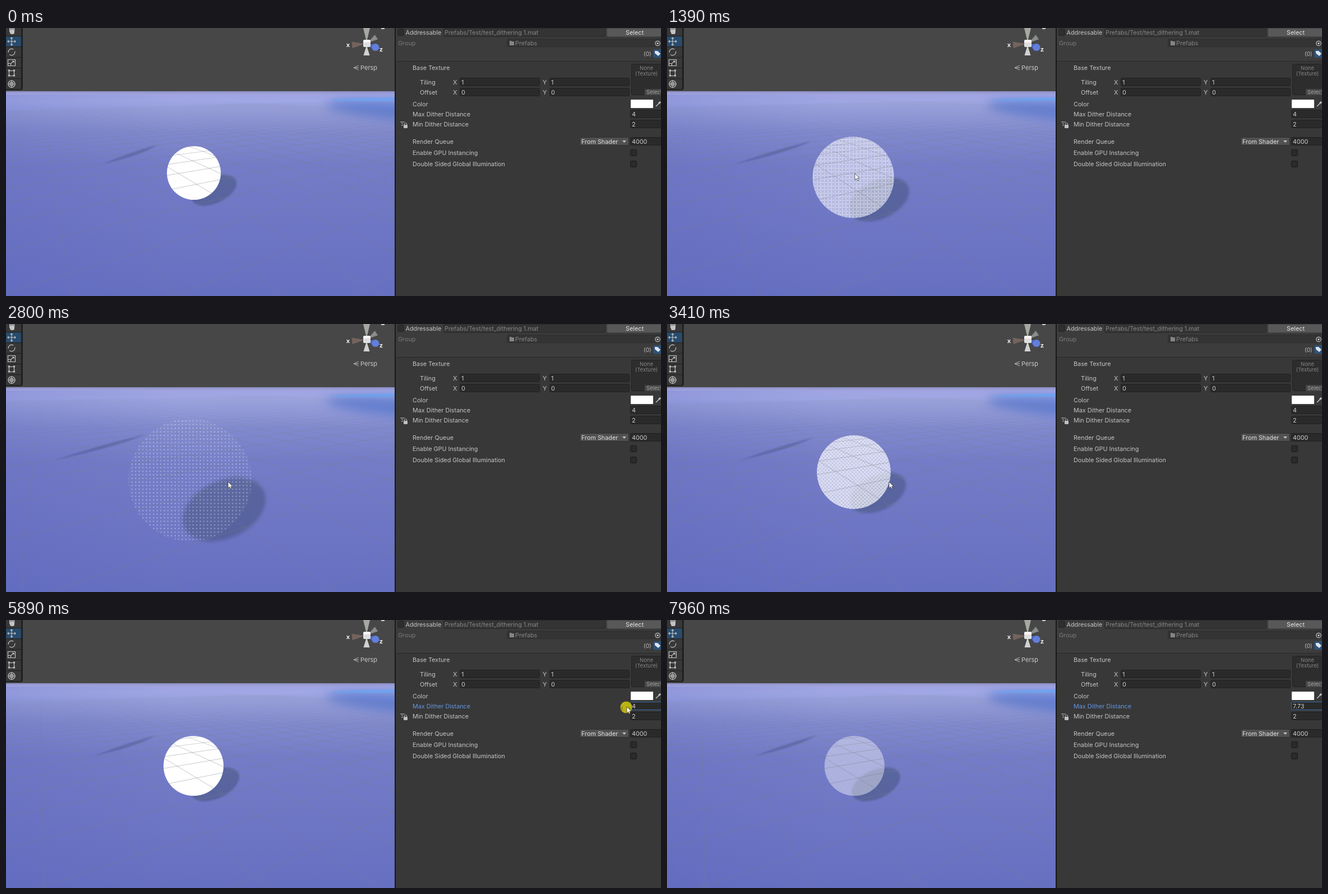
Write an HTML page with a canvas that moves like this. It is 1168 by 479 pixels and loops after 8 s.

```html
<!DOCTYPE html>
<html>
<head>
<meta charset="utf-8">
<style>
html, body { margin: 0; width: 100%; height: 100%; overflow: hidden; background: #383838; }
canvas { display: block; }
</style>
</head>
<body>
<canvas id="stage" width="1168" height="479"></canvas>
<script>
const W = 1168, H = 479, VIEW_W = 693, HORIZON = 113, LOOP = 8000;
const FONT = 'Inter, "Noto Sans", sans-serif';
const ctx = document.getElementById('stage').getContext('2d');

// ---------- timing ----------
const clamp01 = v => Math.max(0, Math.min(1, v));
const easeOut = f => 1 - (1 - f) ** 2;
const stepDown = (v, step) => Math.floor(v / step) * step;

// Scrolling in is one steady exponential dolly; scrolling out comes in bursts.
function distanceAt(t) {
  if (t < 730) return 4.85;
  if (t < 2670) return Math.max(1.73, 4.85 * Math.exp(-0.00068 * stepDown(t - 730, 76)));
  const burst = 200, period = 340, notch = burst / 3;
  const elapsed = t - 2670;
  const scrolled = Math.floor(elapsed / period) * burst +
    Math.min(burst, stepDown(elapsed % period, notch) + notch);
  return 1.73 * (4.35 / 1.73) ** clamp01(scrolled / (3 * burst));
}

function maxDistanceAt(t) {
  if (t >= 7900) return 7.73;
  return 4 + 3.6 * easeOut(clamp01(stepDown(t - 5890, 67) / 1400));
}

function cursorAt(t) {
  let x = 1086, y = 136;
  const glide = (start, end, toX, toY) => {
    const f = easeOut(clamp01(stepDown(t - start, 67) / (end - start)));
    x += (toX - x) * f;
    y += (toY - y) * f;
  };
  glide(70, 460, 335, 260);
  glide(1590, 2130, 396, 282);
  glide(4010, 4750, 1158, 166);
  glide(4820, 5230, 1107, 155);
  return { x, y };
}

// ---------- drawing helpers ----------
function box(x, y, w, h, fill, border, radius = 2) {
  ctx.beginPath();
  ctx.roundRect(x, y, w, h, radius);
  ctx.fillStyle = fill;
  ctx.fill();
  if (border) {
    ctx.strokeStyle = border;
    ctx.lineWidth = 1;
    ctx.stroke();
  }
}
function text(str, x, y, color = '#c4c4c4', size = 10.8, align = 'left', weight = 400) {
  ctx.font = `${weight} ${size}px ${FONT}`;
  ctx.textAlign = align;
  ctx.textBaseline = 'middle';
  ctx.fillStyle = color;
  ctx.fillText(str, x, y + 0.7);
}
function shape(path, fill, stroke, width = 1) {
  const p = new Path2D(path);
  if (fill) { ctx.fillStyle = fill; ctx.fill(p); }
  if (stroke) { ctx.strokeStyle = stroke; ctx.lineWidth = width; ctx.stroke(p); }
}
function ellipse(x, y, rx, ry, fill, angle = 0, blur = 0) {
  ctx.save();
  if (blur) ctx.filter = `blur(${blur}px)`;
  ctx.beginPath();
  ctx.ellipse(x, y, rx, ry, angle, 0, 2 * Math.PI);
  ctx.fillStyle = fill;
  ctx.fill();
  ctx.restore();
}
const disc = (x, y, r, fill) => ellipse(x, y, r, r, fill);
function ring(x, y, r, color, width = 1.2) {
  ctx.beginPath();
  ctx.arc(x, y, r, 0, 2 * Math.PI);
  ctx.strokeStyle = color;
  ctx.lineWidth = width;
  ctx.stroke();
}
function turned(x, y, angle, draw) {
  ctx.save();
  ctx.translate(x, y);
  ctx.rotate(angle);
  draw();
  ctx.restore();
}

// ---------- scene ----------
const groundFill = ctx.createLinearGradient(0, HORIZON, 0, H);
groundFill.addColorStop(0, '#8d90c4');
groundFill.addColorStop(0.015, '#a0a4e0');
groundFill.addColorStop(0.05, '#a0a8e6');
groundFill.addColorStop(0.2, '#8189ce');
groundFill.addColorStop(0.36, '#747cc7');
groundFill.addColorStop(1, '#6670c1');

const leftShade = ctx.createLinearGradient(0, 0, 300, 0);
leftShade.addColorStop(0, 'rgba(85,95,185,.2)');
leftShade.addColorStop(1, 'rgba(85,95,185,0)');

const gridFade = ctx.createLinearGradient(0, 120, 0, 240);
gridFade.addColorStop(0, 'rgba(120,123,132,0)');
gridFade.addColorStop(0.4, 'rgba(120,123,132,.15)');
gridFade.addColorStop(1, 'rgba(120,123,132,.42)');

function drawGround() {
  ctx.fillStyle = '#474747';
  ctx.fillRect(0, 0, VIEW_W, HORIZON);
  ctx.fillStyle = groundFill;
  ctx.fillRect(0, HORIZON, VIEW_W, H);
  ctx.fillStyle = leftShade;
  ctx.fillRect(0, 119, 300, H);
  ellipse(720, 150, 150, 17, 'rgba(82,116,210,.75)', 0.08, 9);
  ellipse(690, 127, 110, 2.5, 'rgba(104,166,243,.9)', -0.02, 1.5);
}

// Ground points are (side, ahead) relative to the sphere; the camera dollies towards it.
const FOCAL = 466, PITCH = 0.274, VIEW_X = 340, GRID_YAW = Math.PI / 6;
const SIN = Math.sin(PITCH), COS = Math.cos(PITCH);

function drawGrid(d) {
  const height = 0.87 + SIN * d, near = 0.4, reach = 60;
  const depthOf = ahead => d + COS * ahead + 0.235;
  const gridPoint = (a, b) => ({
    side: a * Math.sin(GRID_YAW) + b * Math.cos(GRID_YAW),
    ahead: 1.314 - a * Math.cos(GRID_YAW) + b * Math.sin(GRID_YAW)
  });
  const plot = (command, { side, ahead }) => {
    const depth = depthOf(ahead);
    ctx[command](VIEW_X + FOCAL * side / depth, HORIZON + FOCAL * height / (COS * depth));
  };
  const line = pointAt => {
    const base = depthOf(pointAt(0).ahead), slope = depthOf(pointAt(1).ahead) - base;
    const cut = (near - base) / slope;
    const from = slope > 0 ? Math.max(-reach, cut) : -reach;
    const to = slope > 0 ? reach : Math.min(reach, cut);
    if (from >= to) return;
    plot('moveTo', pointAt(from));
    plot('lineTo', pointAt(to));
  };
  ctx.beginPath();
  for (let i = -32; i <= 32; i++) {
    line(s => gridPoint(s, i));
    line(s => gridPoint(i, s));
  }
  ctx.strokeStyle = gridFade;
  ctx.lineWidth = 1;
  ctx.stroke();
}

function drawShadows(d, r) {
  const grow = r - 48, closer = 4.85 - d;
  ellipse(371 + 0.29 * grow, 290 + 0.67 * grow, 43 + 0.57 * grow, 23 + 0.46 * grow,
    'rgba(64,80,120,.5)', -0.436, r / 32);

  const x1 = 172 - 31 * closer, x2 = 270 - 8 * closer, y1 = 243, y2 = 209 - 4 * closer;
  const mx = (x1 + x2) / 2, my = (y1 + y2) / 2;
  ctx.save();
  ctx.filter = 'blur(1.2px)';
  shape(`M${x1} ${y1}Q${mx + 12} ${my - 8} ${x2} ${y2}Q${mx + 20} ${my + 2} ${x1} ${y1}`,
    'rgba(62,74,125,.38)');
  ctx.restore();
}

// Ordered 4x4 dither, built from the 2x2 Bayer rule
const bayer2 = (x, y) => 2 * (x ^ y) + y;
const bayer4 = (x, y) => 4 * bayer2(x & 1, y & 1) + bayer2(x >> 1, y >> 1);
const tile = document.createElement('canvas');
tile.width = tile.height = 4;
const tileCtx = tile.getContext('2d');

function ditherPattern(alpha) {
  tileCtx.clearRect(0, 0, 4, 4);
  tileCtx.fillStyle = 'rgba(255,255,255,.6)';
  for (let y = 0; y < 4; y++) {
    for (let x = 0; x < 4; x++) {
      if (alpha * 18 > bayer4(x, y) + 0.3) tileCtx.fillRect(x, y, 1, 1);
    }
  }
  const pattern = ctx.createPattern(tile, 'repeat');
  pattern.setTransform(new DOMMatrix().scale(1.6));
  return pattern;
}

function drawSphere(r, alpha) {
  if (alpha <= 0) return;
  const x = 335 - 0.11 * (r - 48), y = 259 + 0.32 * (r - 48);
  if (alpha >= 1) return disc(x, y, r, '#fff');
  // A faint even veil softens the dots.
  disc(x, y, r, `rgba(255,255,255,${alpha * 0.4})`);
  disc(x, y, r, ditherPattern(alpha));
}

function drawScene(d, maxDistance) {
  const r = 233 / d;
  ctx.save();
  ctx.beginPath();
  ctx.rect(0, 0, VIEW_W, H);
  ctx.clip();
  drawGround();
  drawShadows(d, r);
  drawSphere(r, (d - 2) / (maxDistance - 2));
  drawGrid(d);
  drawGizmo();
  drawTools();
  ctx.restore();
}

function drawGizmo() {
  const cone = (angle, length, half, color) => turned(643, 28, angle, () =>
    shape(`M3 0L${length} ${-half}V${half}Z`, color));
  cone(-Math.PI / 2, 30, 6.5, '#a4aaa2');
  cone(-0.6, 21, 5, '#8b8b8b');
  cone(3.05, 26, 6, '#74635d');
  cone(0.42, 17, 7, '#4a66c4');
  cone(Math.PI / 2, 21, 5.5, '#d2d2d2');
  disc(659, 34.5, 6.5, '#637fdb');
  box(637, 22, 13, 12, '#dedede');
  box(637, 21, 13, 5, '#f6f6f6');
  text('x', 610, 29.5, '#eee', 11, 'center', 700);
  text('z', 669, 37.5, '#eee', 11, 'center', 700);
  shape('M629 67L620 71L629 75M620 71H629', null, '#bbb');
  text('Persp', 632, 71, '#c8c8c8', 11);
  box(669, -1, 6, 3, '#ccc', null, 0);
}

function drawTools() {
  const ink = '#c4c4c4', row = i => 5 + 19 * i;
  box(-4, -4, 34, 115, '#202020', null, 4);
  for (let i = 0; i < 6; i++) box(-2, row(i) - 9, 29, 18, i === 1 ? '#294b6c' : '#383838', null, 1);

  box(7, 3, 8, 8, ink, null, 3);
  for (let x = 6; x < 15; x += 2.5) box(x, 0, 1.7, 7, ink, null, 1);
  for (let i = 0; i < 4; i++) {
    turned(10, row(1), i * Math.PI / 2, () => shape('M0 0V-7M-2 -5L0 -7L2 -5', null, ink, 1.2));
  }
  ctx.setLineDash([13, 4]);
  ring(10, row(2), 5.8, ink);
  ctx.setLineDash([]);
  shape('M3.5 56.5h13v11h-13zM3.5 63.5h5v4M9 63L14 59M11 59h3v3', null, ink, 1.2);
  shape('M5.5 76.5h9v9h-9z', null, ink, 1.2);
  for (const sx of [-1, 1]) for (const sy of [-1, 1]) disc(10 + 4.5 * sx, row(4) + 4.5 * sy - 0.5, 1.8, ink);
  ring(10, row(5), 6, ink);
  shape('M10 93v14M3 100h14M7.5 97.5h5v5h-5z', null, ink, 1.2);
}

// ---------- inspector ----------
const DIM = '#858585';

function field(x, y, w, value, border = '#202020') {
  box(x + 0.5, y - 7.5, w, 14, '#2a2a2a', border);
  text(value, x + 3, y, '#cfcfcf');
}
function overrideIcon(y, color) {
  shape(`M703 ${y - 5}h8M705 ${y - 2}h3M705 ${y + 1}h3`, null, color);
  box(709, y, 7, 6, color, null, 1);
  shape(`M710.3 ${y}v-1a2.2 2.2 0 0 1 4.4 0v1`, null, color);
}

function drawHeader() {
  box(VIEW_W, 0, W, 59, '#3c3c3c', null, 0);
  box(VIEW_W, 59, W, 1, '#292929', null, 0);
  box(VIEW_W, 0, 2, H, '#191919', null, 0);

  box(698.5, 1.5, 11, 12, '#2e2e2e', '#232323');
  text('Addressable', 712.5, 8);
  box(780.5, 0.5, 288, 15, '#343434', '#2b2b2b');
  text('Prefabs/Test/test_dithering 1.mat', 782, 8, DIM);
  box(1071, 0, 100, 16, '#585858', '#303030');
  text('Select', 1121, 8, '#e6e6e6', 10.8, 'center');

  text('Group', 699, 27, '#7c7c7c');
  box(893.5, 19.5, 280, 14, '#343434', '#2d2d2d');
  shape('M898 23h3l1 1h4v7h-8z', DIM);
  text('Prefabs', 908, 27, DIM);
  ring(1162, 27.5, 4.2, '#c0c0c0');
  disc(1162, 27.5, 1.7, '#c0c0c0');
  text('(0)', 1137, 46, '#c0c0c0', 10);
  box(1154, 38, 20, 15, '#2f5379', null, 3);
  shape('M1157 41h5l5 5l-4 4l-6 -5z', '#dce6f0');
}

function drawInspector(maxDistance, focused, hoverRow) {
  box(VIEW_W, 0, W, H, '#383838', null, 0);
  drawHeader();

  text('Base Texture', 725, 71);
  box(1115.5, 64.5, 60, 55, '#2d2d2d', '#222');
  text('None', 1142, 71, DIM, 9.5, 'center');
  text('(Texture)', 1142, 81.5, DIM, 9.5, 'center');
  box(1139, 109, 35, 11, '#474747', null, 1);
  text('Select', 1142, 114, '#a5a5a5', 9.5);

  ['Tiling', 'Offset'].forEach((label, i) => {
    const y = 97 + 18 * i, value = String(1 - i);
    text(label, 738, y);
    text('X', 797, y);
    field(809, y, 142, value);
    text('Y', 957, y);
    field(969, y, 142, value);
  });

  text('Color', 725, 136);
  box(1114, 128, 40, 15, '#fff', null, 1);
  shape('M1159 140L1164 135', null, '#c4c4c4', 1.5);
  shape('M1164 135L1167 132', null, '#c4c4c4', 3);

  text('Max Dither Distance', 725, 154, focused ? '#6296e2' : '#c4c4c4');
  field(1113, 154, 60, String(+maxDistance.toFixed(2)), focused ? '#3a6cad' : '#202020');
  text('Min Dither Distance', 725, 172);
  field(1113, 172, 60, '2');
  overrideIcon(173, '#c0c0c0');
  if (hoverRow) overrideIcon(244, '#777');

  text('Render Queue', 725, 203);
  box(1023.5, 195.5, 87, 14, '#515151', '#303030');
  text('From Shader', 1026, 203, '#e0e0e0');
  shape('M1099 201h7l-3.5 4z', '#c4c4c4');
  field(1113, 203, 60, '4000');
  ['Enable GPU Instancing', 'Double Sided Global Illumination'].forEach((label, i) => {
    const y = 223 + 20 * i;
    text(label, 725, y);
    box(1113.5, y - 5.5, 11, 11, '#2a2a2a', '#191919');
  });
}

function drawCursor(x, y, pressed, dragIcon) {
  turned(x, y, 0, () => {
    if (pressed) disc(-1, 1, 10.5, 'rgba(194,184,16,.95)');
    if (dragIcon) shape('M-7 0l-3 3l3 3M3 0l3 3l-3 3', null, pressed ? '#837c12' : '#ddd', 1.2);
    shape('M0 0V11.5L2.7 9L4.5 13L6.4 12.1L4.7 8.3H8.2Z', '#fff', 'rgba(30,30,30,.85)', 0.8);
  });
}

function render(t) {
  const maxDistance = maxDistanceAt(t);
  const { x, y } = cursorAt(t);
  const visible = t >= 70 && t < 6690;
  const hoverRow = visible && x > 695 && y > 221 && y < 252;
  drawScene(distanceAt(t), maxDistance);
  drawInspector(maxDistance, t >= 5560, hoverRow);
  // Dragging carries the cursor off the right edge.
  if (visible) drawCursor(x + (maxDistance - 4) * 40, y, t >= 5560, t >= 4890);
}

function tick() {
  render(performance.now() % LOOP);
  requestAnimationFrame(tick);
}
tick();
</script>
</body>
</html>
```
